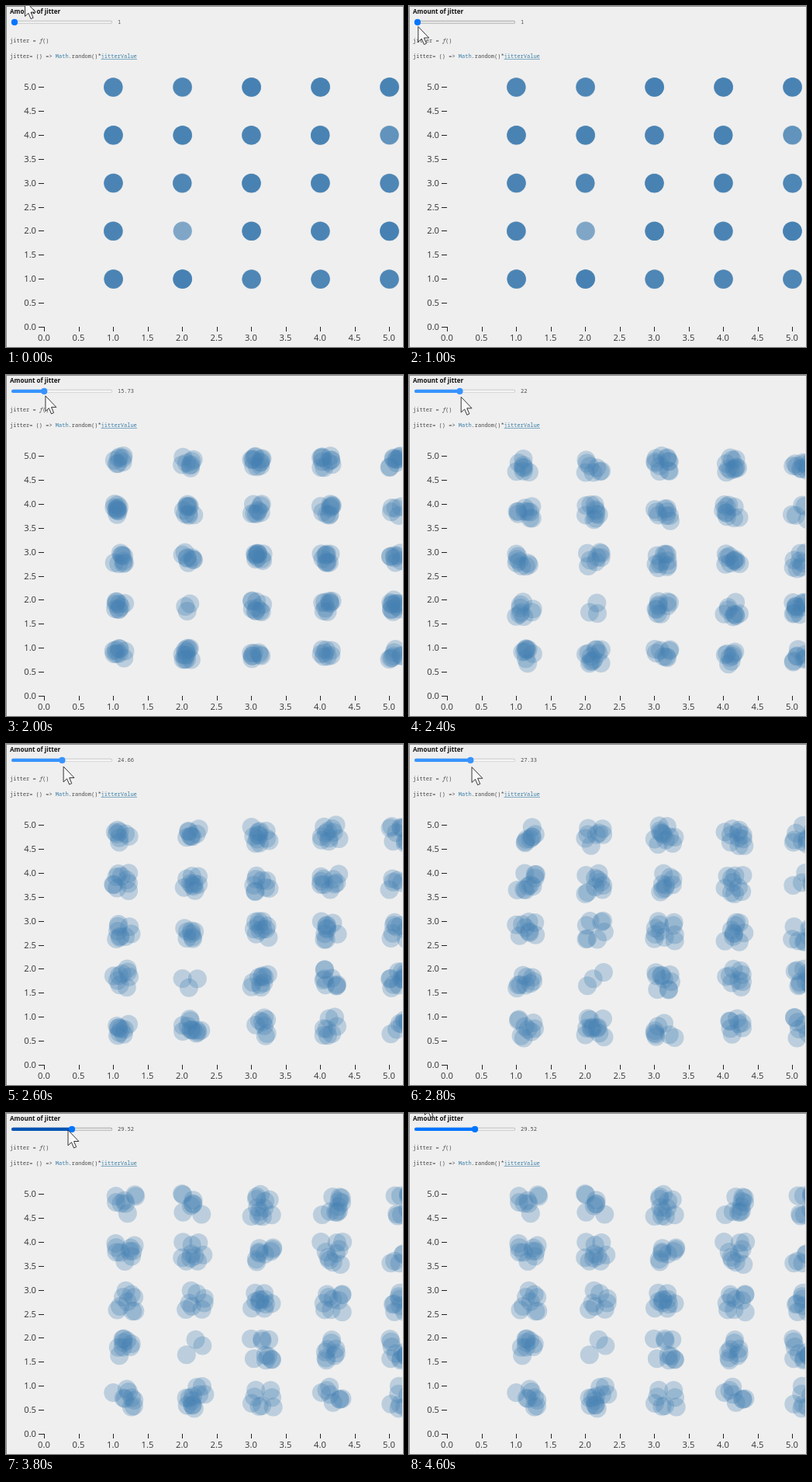
An HTML page with a canvas for the animation above (4.8 s loop, 512 by 439 pixels).

```html
<!DOCTYPE html>
<html lang="en">
<head>
<meta charset="utf-8">
<title>Amount of jitter</title>
<style>
html, body { margin: 0; width: 100%; height: 100%; overflow: hidden; background: #efefef; }
canvas { display: block; width: 512px; height: 439px; }
</style>
</head>
<body>
<canvas id="stage"></canvas>
<script>
const W = 512, H = 439, LOOP = 4800, STEP = 200;
const PRESS = 6, RELEASE = 17; // steps between which the thumb is dragged
const TRACK = { left: 7, width: 130, y: 20.9 };
const MONO = '7px "Noto Sans Mono", "DejaVu Sans Mono", monospace';
const SANS = '11.2px "Open Sans", "Noto Sans", sans-serif';
const GRAY = '#4a4a4a', LINK = '#3a7ea6';

const canvas = document.getElementById('stage');
const ctx = canvas.getContext('2d');
const ratio = window.devicePixelRatio || 1;
canvas.width = W * ratio;
canvas.height = H * ratio;
ctx.scale(ratio, ratio);

// Key points: step, then the values to interpolate
const drag = [[PRESS, 1], [8, 5.08], [10, 15.73], [12, 22], [14, 27.33], [15, 29.52]];
const approach = [[0, 24, -7], [1, 17, 25], [3, 8, 28], [PRESS, 13, 25]];
const leave = [[RELEASE, 86, 30], [18, 84, 17], [19, 79.5, 21.5], [20, 63, 2], [21, 20, -21], [23, 20, -18]];

const px = v => 49 + 89 * v;
const py = v => 413 - 61.8 * v;
const thumbX = value => 11 + (value - 1) * 2.595;

function along(keys, step) {
  const i = keys.findIndex(k => k[0] >= step);
  if (i < 0) return keys[keys.length - 1].slice(1);
  if (i === 0) return keys[0].slice(1);
  const [a, b] = [keys[i - 1], keys[i]];
  const f = (step - a[0]) / (b[0] - a[0]);
  return a.slice(1).map((v, j) => v + (b[j + 1] - v) * f);
}

function pointerAt(step, value) {
  if (step < PRESS) return along(approach, step);
  if (step >= RELEASE) return along(leave, step);
  return [thumbX(value) + 1.2, Math.min(30, 25 + 0.7 * Math.max(0, step - 8))];
}

function sliderColors(step, value, [x, y]) {
  if (step >= PRESS && step < RELEASE) {
    return { fill: '#3793ff', thumb: '#3793ff', rest: '#f5f5f5', edge: '#bdbdbd' };
  }
  const over = y > 14 && y <= 26;
  const onThumb = Math.hypot(x - thumbX(value), y - TRACK.y) < 5;
  return {
    fill: over ? '#0054b4' : '#0075ff',
    thumb: onThumb ? '#0054b4' : '#0075ff',
    rest: over ? '#e5e5e5' : '#efefef',
    edge: over ? '#9a9a9a' : '#b2b2b2'
  };
}

function random(seed) {
  return () => {
    seed = (seed + 0x6D2B79F5) | 0;
    let t = Math.imul(seed ^ (seed >>> 15), 1 | seed);
    t = (t + Math.imul(t ^ (t >>> 7), 61 | t)) ^ t;
    return ((t ^ (t >>> 14)) >>> 0) / 4294967296;
  };
}

// Points per grid cell: mostly 8 to 12, with two sparse cells
const countRand = random(7);
const cells = [];
for (let y = 5; y >= 1; y--) {
  for (let x = 1; x <= 5; x++) cells.push({ x, y, n: 8 + Math.floor(countRand() * 5) });
}
cells.find(c => c.x === 2 && c.y === 2).n = 3;
cells.find(c => c.x === 5 && c.y === 4).n = 5;

function text(s, x, y, font, color, align = 'left') {
  ctx.font = font;
  ctx.fillStyle = color;
  ctx.textAlign = align;
  ctx.fillText(s, x, y);
}

// Draws coloured pieces of text one after another
function textRun(x, y, pieces) {
  for (const [s, color, style = ''] of pieces) {
    text(s, x, y, style + MONO, color);
    x += ctx.measureText(s).width;
  }
}

function disc(x, y, r, color) {
  ctx.fillStyle = color;
  ctx.beginPath();
  ctx.arc(x, y, r, 0, Math.PI * 2);
  ctx.fill();
}

function bar(x, y, w, h, color) {
  ctx.fillStyle = color;
  ctx.beginPath();
  ctx.roundRect(x, y, w, h, h / 2);
  ctx.fill();
}

function drawPoints(jitter) {
  const rand = random(Math.round(jitter * 100));
  ctx.save();
  ctx.beginPath();
  ctx.rect(0, 0, W - 1, H);
  ctx.clip();
  for (const { x, y, n } of cells) {
    for (let i = 0; i < n; i++) {
      disc(px(x) + rand() * jitter, py(y) + rand() * jitter, 12, 'rgba(70, 130, 180, 0.3)');
    }
  }
  ctx.restore();
}

function drawAxes() {
  for (let v = 0; v <= 5; v += 0.5) {
    const x = px(v), y = py(v), label = v.toFixed(1);
    ctx.fillStyle = '#222';
    ctx.fillRect(42, Math.round(y), 7, 1);
    ctx.fillRect(Math.round(x), 413, 1, 6);
    text(label, 39, y + 4, SANS, '#333', 'right');
    text(label, x, 431, SANS, '#333', 'center');
  }
}

function drawSlider(value, { fill, thumb, rest, edge }) {
  const x = thumbX(value), { left, width, y } = TRACK;
  bar(left, y - 2.1, width, 4.2, edge);
  bar(left + 0.6, y - 1.5, width - 1.2, 3, rest);
  bar(left, y - 2.1, x - left, 4.2, fill);
  disc(x, y, 4.1, thumb);
  text(String(+value.toFixed(2)), 144, 23, MONO, GRAY);
}

function drawText() {
  text('Amount of jitter', 5, 10, 'bold 8.05px "Open Sans", sans-serif', '#111');
  textRun(5, 47, [['jitter = ', GRAY], ['ƒ', GRAY, 'italic '], ['()', GRAY]]);
  textRun(5, 67, [['jitter= () => ', GRAY], ['Math', LINK], ['.random()*', GRAY], ['jitterValue', LINK]]);
  ctx.fillStyle = '#7fabc5';
  ctx.fillRect(122.6, 68, 46.4, 1);
}

function drawPointer([x, y]) {
  const outline = [[0, 0], [0, 16], [3.6, 12.7], [6.1, 18.6], [8.6, 17.5], [6.1, 11.7], [11.2, 11.7]];
  ctx.beginPath();
  outline.forEach(([dx, dy]) => ctx.lineTo(x + 0.5 + dx * 1.24, y + 0.5 + dy * 1.24));
  ctx.closePath();
  ctx.fillStyle = '#f8f8f8';
  ctx.fill();
  ctx.strokeStyle = '#222';
  ctx.lineWidth = 0.9;
  ctx.stroke();
}

function draw(step) {
  const [value] = along(drag, step);
  const pointer = pointerAt(step, value);
  ctx.fillStyle = '#efefef';
  ctx.fillRect(0, 0, W, H);
  drawPoints(value);
  drawAxes();
  drawText();
  drawSlider(value, sliderColors(step, value, pointer));
  ctx.fillStyle = '#8c8c8c';
  ctx.fillRect(0, 0, W, 1);
  ctx.fillRect(0, 0, 1, H);
  drawPointer(pointer);
}

const start = performance.now();
function tick() {
  const t = (performance.now() - start) % LOOP;
  draw(Math.floor(t / STEP));
  requestAnimationFrame(tick);
}
tick();
</script>
</body>
</html>
```
